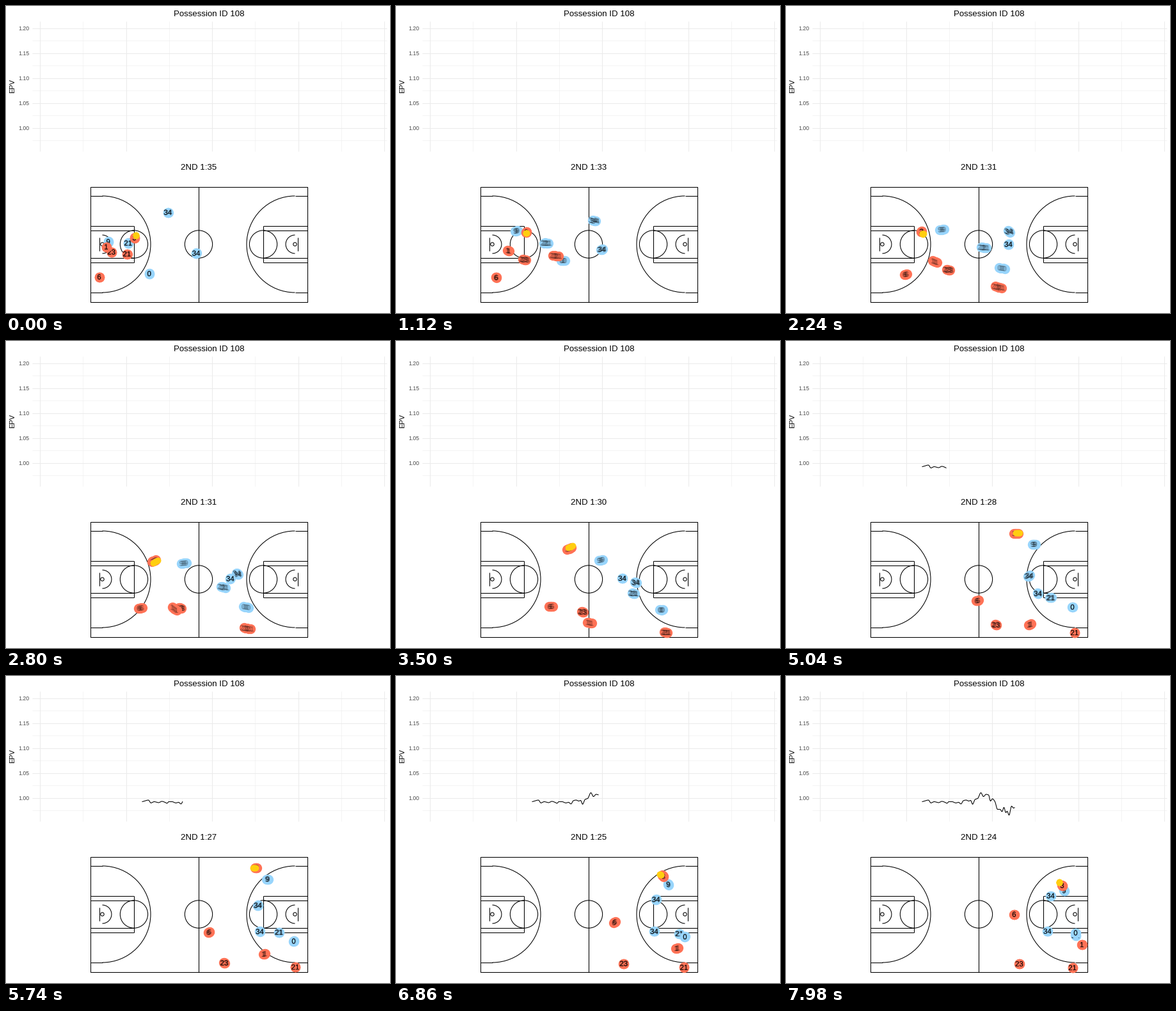
A matplotlib script for the animation above (8000 ms loop, 600 by 480 pixels).

```python
import numpy as np
import matplotlib.pyplot as plt
from matplotlib.animation import FuncAnimation
from matplotlib.collections import PathCollection
from matplotlib.patches import Arc, Circle, Rectangle
from matplotlib.path import Path
from matplotlib.textpath import TextPath
from matplotlib.transforms import IdentityTransform

W, H, DPI = 600, 480, 100
LOOP, TICK, STEP = 8000, 40, 140      # ms
PT = 72 / DPI                         # points per pixel
plt.rcParams["font.family"] = "Liberation Sans"

# Waypoints: step number, then one (x, y) per step for every player
KEYS = np.array([0, 8, 16, 25, 32, 41, 57], float)
BLUE = [
    ("34", [(252, 322), (309, 335), (348, 352), (374, 377), (390, 388), (396, 399), (408, 398.5)]),
    ("34", [(296.5, 386), (321, 380), (347, 372), (353, 370.5), (367, 371), (393, 358), (413, 343)]),
    ("21", [(190, 370), (234, 370), (308.5, 377), (370.5, 394), (400, 401.5), (426, 400), (452, 405)]),
    ("9", [(159, 368), (187.5, 351), (243, 349), (319.5, 342), (364, 318), (408, 317), (434, 335)]),
    ("0", [(223, 418), (260.5, 397.5), (337, 409.5), (414, 420), (444, 416.5), (449, 414), (452, 401)]),
]
RED = [
    ("21", [(188, 387), (249, 390), (331.5, 439), (421.5, 455), (448, 456), (451.5, 454.5), (447, 455.5)]),
    ("23", [(164, 384), (200, 396), (253, 412), (291, 423), (315, 437), (340.5, 448), (364, 449.5)]),
    ("6", [(145, 423), (156, 424), (186.5, 419), (241.5, 414.5), (281, 409), (316.5, 400), (356, 372)]),
    ("1", [(156, 376), (175, 382), (232, 399), (302, 440), (359, 447), (403, 434), (462, 419.5)]),
    ("3", [(200, 362), (203, 353), (211, 352), (270, 324), (327, 303), (390, 299), (431, 327)]),
]
BALL = [(202, 358), (203, 354), (213, 356), (272, 321), (334, 300.5), (387.5, 299.5), (426.5, 322)]

EPV = np.array([
    (212, 196), (216, 195), (222, 193.5), (226, 198), (231, 196), (238, 197.5),
    (243, 195.5), (248, 197), (251, 198.5), (254, 196), (259, 196), (265, 198),
    (269, 197), (273, 199.5), (276.5, 194.5), (281, 193.5), (285, 195), (288, 194),
    (291, 200), (295, 192.5), (299, 191), (304, 182), (308, 188), (312, 184.5),
    (316, 185.5), (319, 195), (322, 191.5), (326, 196), (330, 208), (334, 208),
    (337, 211.5), (340, 205), (343, 213), (345, 211), (348, 217), (352, 203),
    (355, 206), (357, 205)])


def spline(t, v, q):
    """Monotone cubic through (t, v), slow at both ends."""
    h = np.diff(t)
    d = np.diff(v) / h
    a, b = d[:-1], d[1:]
    same = a * b > 0
    inner = np.where(same, 2 * a * b / np.where(same, a + b, 1), 0)
    m = np.concatenate([[0.3 * d[0]], inner, [0.3 * d[-1]]])
    q = np.clip(q, t[0], t[-1])
    i = np.clip(np.searchsorted(t, q, side="right") - 1, 0, len(h) - 1)
    u = (q - t[i]) / h[i]
    return ((1 + 2 * u) * (1 - u) ** 2 * v[i] + u * (1 - u) ** 2 * h[i] * m[i]
            + u * u * (3 - 2 * u) * v[i + 1] + u * u * (u - 1) * h[i] * m[i + 1])


def trail(path, step):
    """Five positions passed during one step."""
    path = np.array(path, float)
    q = step + np.linspace(-0.45, 0.45, 5)
    return np.column_stack([spline(KEYS, path[:, k], q) for k in (0, 1)])


fig = plt.figure(figsize=(W / DPI, H / DPI), dpi=DPI, facecolor="white")
ax = fig.add_axes([0, 0, 1, 1])
ax.set_xlim(-0.5, W - 0.5)
ax.set_ylim(H - 0.5, -0.5)
ax.axis("off")


def line(xs, ys, color="black", width=1.07, z=2):
    return ax.plot(xs, ys, color=color, lw=width * PT, zorder=z,
                   solid_capstyle="butt")[0]


def label(x, y, s, size, color="black", **kw):
    return ax.text(x, y, s, size=size * PT, color=color, **kw)


def draw_chart():
    grey, left, right, top, bottom = "#EBEBEB", 40.5, 594, 23.5, 226.5
    for k in range(9):
        x, width = 52.5 + 67.28 * k, 0.55 if k % 2 else 1.07
        line([x, x], [top, bottom], grey, width, 1)
    for k in range(10):
        y, width = 34 + 19.5 * k, 0.55 if k % 2 else 1.07
        line([left, right], [y, y], grey, width, 1)
        if k % 2 == 0:
            label(36, y + 3.6, f"{1.2 - 0.025 * k:.2f}", 8.8, "#4D4D4D", ha="right")
    label(317, 15, "Possession ID 108", 13.2, ha="center")
    label(10, 125, "EPV", 11, rotation=90, ha="center", va="center")


def draw_court():
    cx, cy, ft = 300.5, 372, 3.606
    style = dict(fill=False, ec="black", lw=1.07 * PT, zorder=2)

    def circle(x, r):
        ax.add_patch(Circle((x, cy), r, **style))

    def half(x, r, side):
        start = -90 if side < 0 else 90
        ax.add_patch(Arc((x, cy), 2 * r, 2 * r, theta1=start, theta2=start + 180, **style))

    ax.add_patch(Rectangle((131, 282), 339, 180, **style))
    line([cx, cx], [282, 462])
    circle(cx, 6 * ft)
    for side in (-1, 1):
        base, foul, hoop, board = (cx + side * d for d in (169.5, 101, 150.5, 155))
        for w in (8, 6):
            for y in (cy - w * ft, cy + w * ft):
                line([base, foul], [y, y])
        line([foul, foul], [cy - 8 * ft, cy + 8 * ft])
        circle(foul, 6 * ft)
        circle(hoop, 0.75 * ft)
        line([board, board], [cy - 3 * ft, cy + 3 * ft])
        half(hoop, 4 * ft, side)
        half(hoop, 75.5, side)
        for y in (cy - 75.5, cy + 75.5):
            line([base, hoop], [y, y])


def dots(color, size, z):
    return ax.scatter([0], [0], s=(size * PT) ** 2, color=color, lw=0, zorder=z)


def numbers(text, z):
    raw = TextPath((0, 0), text, size=11.4)
    box = raw.get_extents()
    center = [(box.x0 + box.x1) / 2, (box.y0 + box.y1) / 2]
    glyphs = Path(raw.vertices - center, raw.codes)
    marks = PathCollection([glyphs], offsets=[(0, 0)], offset_transform=ax.transData,
                           facecolors="black", linewidths=0, alpha=0.38, zorder=z)
    marks.set_transform(IdentityTransform())
    ax.add_collection(marks, autolim=False)
    return marks


draw_chart()
draw_court()
curve_x = np.linspace(EPV[0, 0], EPV[-1, 0], 291)
curve_y = spline(EPV[:, 0], EPV[:, 1], curve_x)
curve = line([], [], z=3)
clock = label(301, 255.5, "", 13.2, ha="center")

movers = []
for team, color in ((BLUE, "#98D5FC"), (RED, "#FF7256")):
    for text, path in team:
        z = 10 + 2 * len(movers)
        movers.append((path, [dots(color, 15.3, z), numbers(text, z + 1)]))
movers.append((BALL, [dots("#FFCE10", 9.8, 50)]))


def update(i):
    step = (i * TICK + TICK // 2) // STEP
    for path, parts in movers:
        pts = trail(path, step)
        for part in parts:
            part.set_offsets(pts)
    shown = curve_x <= 230 + 5.08 * (step - 32)
    curve.set_data(curve_x[shown], curve_y[shown])
    left = int(95.03 - 0.191 * step)
    clock.set_text(f"2ND {left // 60}:{left % 60:02d}")
    return []


anim = FuncAnimation(fig, update, frames=LOOP // TICK, interval=TICK,
                     repeat=True, repeat_delay=0, init_func=lambda: update(0))
plt.show()
```
